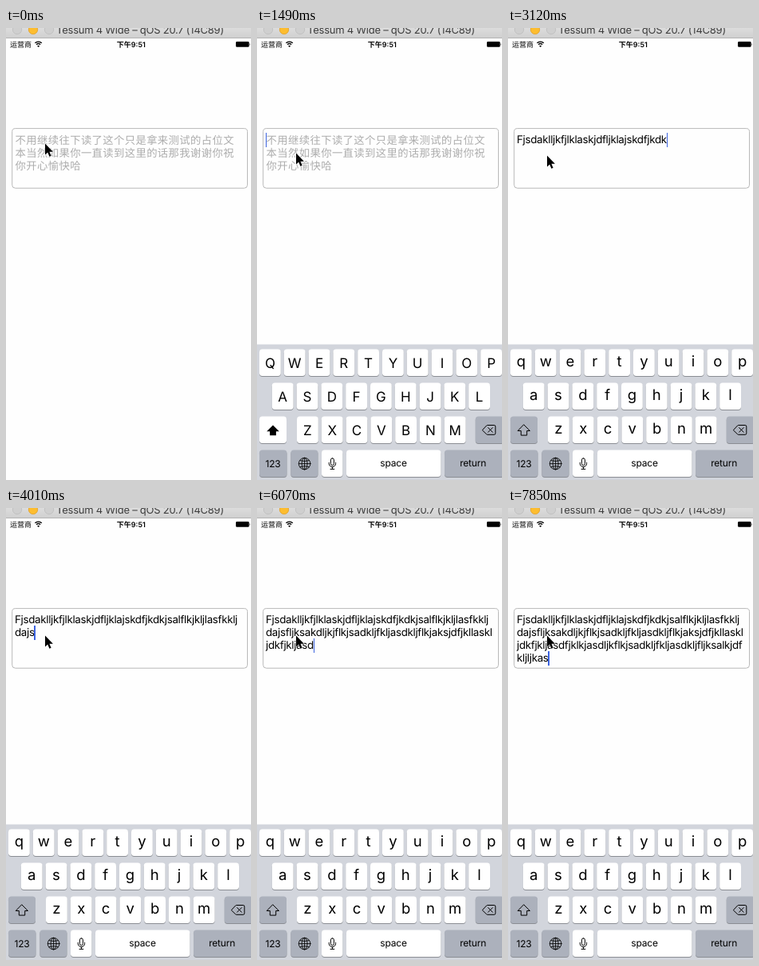
An HTML page for the animation above (8000 ms loop, 307 by 565 pixels).

```html
<!DOCTYPE html>
<html lang="zh">
<head>
<meta charset="utf-8">
<title>Text view with placeholder</title>
<style>
  html, body { margin: 0; width: 100%; height: 100%; overflow: hidden; background: #fefefe; }
  body { position: relative; font-family: Inter, "Noto Sans CJK SC", "Noto Sans CJK", sans-serif; }
  svg { position: absolute; left: 0; top: 0; width: 307px; height: 565px; }
  svg text { text-anchor: middle; text-rendering: geometricPrecision; }
  .field { position: absolute; font-size: 13.35px; line-height: 16px; white-space: pre; text-rendering: geometricPrecision; }
  #hint { left: 11.6px; top: 131.5px; color: #adadad; letter-spacing: .37px;
          font-family: "Noto Sans CJK SC", "Noto Sans CJK", sans-serif; }
  #typed { left: 11px; top: 132px; color: #000; letter-spacing: -.32px; font-variant-ligatures: none; }
  #caret { position: relative; font-style: normal; }
  #caret::after { content: ""; position: absolute; left: -.3px; top: -1px; width: 1.6px; height: 18px; background: #3c63e0; }
  .cap { font-size: 17px; }
  .low { font-size: 18.5px; }
  .label { font-size: 12px; letter-spacing: -.2px; }
  .line { fill: none; stroke: #000; stroke-width: 1; stroke-linejoin: round; stroke-linecap: round; }
</style>
</head>
<body>
<svg viewBox="0 0 307 565">
  <defs>
    <linearGradient id="bar" x2="0" y2="1">
      <stop offset="0" stop-color="#dcdcdc"/><stop offset="1" stop-color="#d0d0d0"/>
    </linearGradient>
  </defs>
  <rect width="307" height="12" fill="url(#bar)"/>
  <rect y="12" width="307" height="1" fill="#b4b4b4"/>
  <g stroke-width=".8">
    <circle cx="14" cy="2" r="5.7" fill="#cfcfcf" stroke="#bdbdbd"/>
    <circle cx="34" cy="2" r="5.7" fill="#fdbd2f" stroke="#e0a02a"/>
    <circle cx="54" cy="2" r="5.7" fill="#cfcfcf" stroke="#bdbdbd"/>
  </g>
  <text x="168" y="7.4" font-size="13" letter-spacing="-.25" fill="#3d3d3d">Tessum 4 Wide – qOS 20.7 (14C89)</text>

  <text x="18.4" y="23.8" font-size="9">运营商</text>
  <g fill="none" stroke="#000" stroke-width="1.3" transform="translate(0 -.5)">
    <path d="M36.4 19.3a6 6 0 0 1 8.4 0M38.1 21.2a3.6 3.6 0 0 1 5 0"/>
    <path d="M40.6 24.6l-1.5-1.7a2.2 2.2 0 0 1 3 0z" fill="#000" stroke="none"/>
  </g>
  <text x="156.8" y="23.8" font-size="9" font-weight="600">下午9:51</text>
  <rect x="288" y="17" width="16.6" height="6.8" rx="1.4"/>
  <path d="M305.3 18.9q1.2 1.5 0 3z"/>

  <rect x="7.7" y="125.6" width="294.8" height="74.6" rx="4" fill="none" stroke="#b9b9b9"/>

  <g id="board">
    <rect y="395.5" width="307" height="172" fill="#d2d5dc"/>
    <g id="keys"></g>
    <g id="upper">
      <path d="M20 496.5l7.8 7.8h-3.9v5h-7.8v-5h-3.9z"/>
    </g>
    <g id="lower">
      <path class="line" d="M20 496l7.4 7.5h-3.7v5.6h-7.4v-5.6h-3.7z"/>
    </g>
    <g class="line">
      <path d="M282.6 502.4l5-5.4q.5-.5 1.2-.5h8.4q1.6 0 1.6 1.6v8.6q0 1.6-1.6 1.6h-8.4q-.7 0-1.2-.5z"/>
      <path d="M289.6 499.6l5.6 5.6m0-5.6l-5.6 5.6"/>
      <g stroke-width=".85">
        <circle cx="59.6" cy="544.6" r="7.3"/>
        <ellipse cx="59.6" cy="544.6" rx="3.5" ry="7.3"/>
        <path d="M59.6 537.3v14.6M52.3 544.6h14.6M53.8 540.6q5.8 2 11.6 0M53.8 548.6q5.8-2 11.6 0"/>
      </g>
      <rect x="92.4" y="537.8" width="4" height="8.8" rx="2"/>
      <path d="M90.2 543.4v1a4.2 4.2 0 0 0 8.4 0v-1M94.4 548.6v2.6M92 551.4h4.8"/>
    </g>
    <text class="label" x="20" y="548.6">123</text>
    <text class="label" x="171" y="547.8">space</text>
    <text class="label" x="270.6" y="547.8">return</text>
  </g>
</svg>

<div class="field" id="hint">不用继续往下读了这个只是拿来测试的占位文
本当然如果你一直读到这里的话那我谢谢你祝
你开心愉快哈</div>
<div class="field" id="typed"><span id="out"></span><i id="caret">&#8203;</i></div>

<svg viewBox="0 0 307 565">
  <path id="mouse" d="M49 0v14.2l3.2-3 2.2 5.1 2.2-.9-2.2-5h4.5z"
        stroke="#fff" stroke-width="1" paint-order="stroke" stroke-linejoin="round"/>
</svg>

<script>
const $ = id => document.getElementById(id);
const LOOP = 8000, START = 900, STEP = 147.5, LAST = 47, FIRST_TYPED = 8;
const LINES = [
  "Fjsdaklljkfjlklaskjdfljklajskdfjkdkjsalflkjkljlasfkklj",
  "dajsfljksakdljkjflkjsadkljfkljasdkljflkjaksjdfjkllaskl",
  "jdkfjkljasdfjklkjasdljkflkjsadkljfkljasdkljfljksalkjdf",
  "kljljkas"
];
// [step, characters typed by then]
const PACE = [[8, 4], [15, 35], [23, 66], [26, 80], [31, 99], [35, 119], [47, 170]];

function add(parent, name, attrs, text) {
  const el = document.createElementNS("http://www.w3.org/2000/svg", name);
  for (const a in attrs) el.setAttribute(a, attrs[a]);
  if (text) el.textContent = text;
  parent.appendChild(el);
  return el;
}

function key(x, y, width, dark) {
  const box = { x, width, height: 33.3, rx: 3.7 };
  add($("keys"), "rect", { ...box, y: y + 1, fill: "#8b8e94" });
  return add($("keys"), "rect", { ...box, y, fill: dark ? "#acb1bc" : "#fff" });
}

[["qwertyuiop", 3], ["asdfghjkl", 18.8], ["zxcvbnm", 50]].forEach(([row, left], r) => {
  const y = 401.6 + 42 * r;
  [...row].forEach((c, i) => {
    const x = left + 30.8 * i;
    key(x, y, 26.8);
    add($("upper"), "text", { class: "cap", x: x + 13.4, y: y + 23 }, c.toUpperCase());
    add($("lower"), "text", { class: "low", x: x + 13.4, y: y + 21.4 }, c);
  });
});
const shift = key(3, 485.6, 34, true);
key(273.8, 485.6, 36, true);
key(3, 527.6, 34.4, true);
key(42.4, 527.6, 34, true);
key(81, 527.6, 26.4);
key(112, 527.6, 118.4);
key(235, 527.6, 75, true);

function typedCount(k) {
  if (k < FIRST_TYPED) return 0;
  const i = Math.max(1, PACE.findIndex(p => p[0] >= k));
  const [k0, n0] = PACE[i - 1], [k1, n1] = PACE[i];
  return Math.round(n0 + (n1 - n0) * (k - k0) / (k1 - k0));
}

function textUpTo(n) {
  const shown = [];
  for (const line of LINES) {
    if (n <= 0) break;
    shown.push(line.slice(0, n));
    n -= line.length;
  }
  return shown.join("\n");
}

const show = (id, on) => { $(id).style.display = on ? "" : "none"; };

function draw(t) {
  const k = Math.min(LAST, Math.floor((t - START) / STEP));
  const typing = k >= FIRST_TYPED;
  show("board", k >= 0);
  show("caret", k >= 0);
  show("hint", !typing);
  show("upper", !typing);
  show("lower", typing);
  shift.setAttribute("fill", typing ? "#acb1bc" : "#fff");
  $("board").setAttribute("transform", `translate(0 ${k === 0 ? 1.2 : 0})`);
  $("out").textContent = textUpTo(typedCount(k));
  const moved = Math.min(5, Math.max(0, k)) / 5;
  $("mouse").setAttribute("transform", `translate(0 ${144.4 + 15 * moved})`);
}

const t0 = performance.now();
function tick() {
  draw((performance.now() - t0) % LOOP);
  requestAnimationFrame(tick);
}
tick();
</script>
</body>
</html>
```
